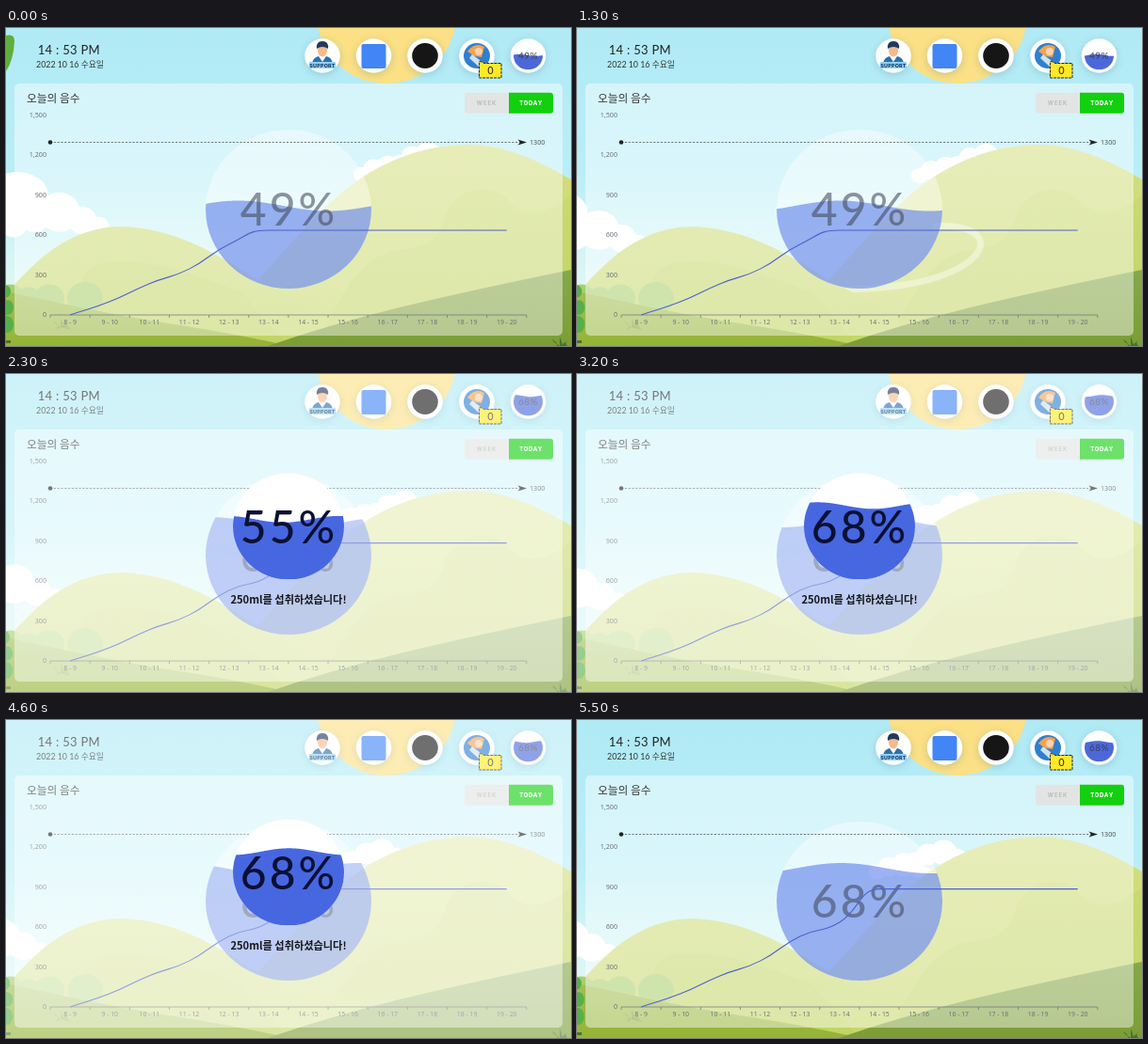
An HTML page with a canvas that plays this animation: 600 px wide and 338 px high, repeating every 5600 ms.

```html
<!DOCTYPE html>
<html lang="ko">
<head>
<meta charset="utf-8">
<title>오늘의 음수</title>
<style>
  html, body { margin: 0; height: 100%; overflow: hidden; }
  canvas { display: block; width: 100%; height: 100%; }
</style>
</head>
<body>
<canvas id="stage" width="600" height="338"></canvas>
<script>
const ctx = document.getElementById('stage').getContext('2d');
const LOOP = 5600, STEP = 100;
const DRINK_AT = 1900, MODAL_IN = 2000, MODAL_OUT = 5000;
const SANS = 'Inter, "Noto Sans CJK KR", sans-serif';
const KOREAN = '"Noto Sans CJK KR", "Noto Sans CJK", sans-serif';
const LABEL = '"Noto Sans", sans-serif';
const ROUND = 'Lato, sans-serif';

const clamp = v => Math.max(0, Math.min(1, v));
const mix = (a, b, k) => a + (b - a) * k;
const easeOut = k => 1 - (1 - k) ** 3;

function text(str, x, y, size, color, opts = {}) {
  const { align = 'center', weight = 400, font = SANS, spacing = 0 } = opts;
  ctx.font = `${weight} ${size}px ${font}`;
  ctx.letterSpacing = spacing + 'px';
  ctx.textAlign = align;
  ctx.fillStyle = color;
  ctx.fillText(str, x, y);
}

function oval(x, y, rx, ry, color) {
  ctx.beginPath();
  ctx.ellipse(x, y, rx, ry, 0, 0, Math.PI * 2);
  ctx.fillStyle = color;
  ctx.fill();
}

function box(x, y, w, h, radius, color) {
  ctx.beginPath();
  ctx.roundRect(x, y, w, h, radius);
  ctx.fillStyle = color;
  ctx.fill();
}

function shape(path, color) {
  ctx.fillStyle = color;
  ctx.fill(new Path2D(path));
}

function verticalGradient(y0, y1, ...colors) {
  const g = ctx.createLinearGradient(0, y0, 0, y1);
  colors.forEach((c, i) => g.addColorStop(i / (colors.length - 1), c));
  return g;
}

function cloud(x, y, size) {
  for (const [dx, dy, r] of [[-38, 9, 13], [-18, 0, 17], [6, -3, 20], [28, 5, 14], [44, 11, 10]])
    oval(x + dx * size, y + dy * size, r * size, r * size * 0.95, '#fff');
}

function grass(x, y, color) {
  for (const a of [-1, 0, 1])
    shape(`M${x} ${y} q${a * 7} -4 ${a * 8} ${Math.abs(a) * 3 - 10} q${2 - a * 6} 4 3 10Z`, color);
}

function liquid(cx, cy, rx, ry, level, amp, wavelength, crest, color) {
  ctx.save();
  ctx.beginPath();
  ctx.ellipse(cx, cy, rx, ry, 0, 0, Math.PI * 2);
  ctx.clip();
  ctx.beginPath();
  ctx.moveTo(cx - rx, cy + ry);
  for (let x = cx - rx; x <= cx + rx; x++)
    ctx.lineTo(x, level - amp * Math.cos((x - crest) / wavelength * Math.PI * 2));
  ctx.lineTo(cx + rx + 1, cy + ry);
  ctx.fillStyle = color;
  ctx.fill();
  ctx.restore();
}

function landscape(t) {
  ctx.fillStyle = verticalGradient(0, 300, '#b0eaf5', '#b9eef7', '#e6f8f4');
  ctx.fillRect(0, 0, 600, 338);
  oval(404, -14, 74, 73, '#fbe085');

  const k = t / LOOP, drift = 1 - Math.exp(-t / 2000);
  cloud(402 - 60 * k, 150 + 6 * k, 0.65);
  cloud(444 - 60 * k, 137 + 6 * k, 0.7);
  oval(12 - 70 * drift, 178 + 40 * drift, 33, 25, '#fff');
  cloud(50 - 70 * drift, 199 + 40 * drift, 1.1);

  // Right hill and its shaded side.
  shape('M240 338 L262 274 C300 232 325 202 354 177 C398 140 445 124 492 124 C530 124 568 142 600 161 V338Z',
    verticalGradient(125, 300, '#d3de80', '#c9d96e'));
  shape('M330 338 C350 295 370 248 410 237 C455 232 460 222 467 198 C480 168 512 166 530 180 C550 206 575 198 600 178 V338Z',
    'rgba(160,190,60,.14)');
  const trail = 0.4 * clamp(1 - Math.abs(t - 1300) / 550);
  if (trail > 0) {
    ctx.strokeStyle = `rgba(255,255,255,${trail})`;
    ctx.lineWidth = 7;
    ctx.stroke(new Path2D('M378 211 C440 206 448 242 385 264 Q345 278 270 278'));
  }

  // Left hill with its plateau, bushes and dark foreground.
  shape('M0 283 C25 255 62 211 124 211 C180 213 225 241 260 263 Q290 281 322 295 L340 338 H0Z',
    verticalGradient(211, 320, '#cddb78', '#c5d76a'));
  shape('M70 338 C98 280 62 262 102 250 C150 242 200 262 250 281 L300 338Z', 'rgba(160,190,60,.12)');
  for (const [x, r] of [[4, 16], [24, 13], [46, 16], [84, 19]])
    oval(x, 287, r, r * 0.9, '#a9cf6c');
  shape('M0 280 C60 293 110 304 160 312 Q240 324 301 338 H0Z', verticalGradient(280, 338, '#a2bf52', '#95b335'));
  shape('M278 338 Q344 315 418 297 T600 257 V338Z', verticalGradient(257, 338, '#85a84c', '#7c9d35'));

  const sway = Math.sin(k * Math.PI * 4);
  for (const [x, y, r] of [[0, 280, 5], [2, 297, 6], [1, 315, 7]])
    oval(x + sway, y, r, r * 1.3, '#55b04a');
  const leaf = -t * 0.02;
  shape(`M${leaf} 8 Q${leaf + 9} 6 ${leaf + 9} 14 Q${leaf + 8} 34 ${leaf} 46Z`, '#5fae3c');
  grass(588, 338, '#47752f');
  grass(58, 318, 'rgba(90,140,50,.5)');
  shape('M0 332 H5 V335 H0Z', '#47752f');
}

function header() {
  text('14 : 53 PM', 66.8, 28.3, 13, '#222', { font: ROUND, spacing: 0.3 });
  text('2022 10 16 수요일', 68, 41.5, 8.8, '#333', { font: `Lato, ${KOREAN}` });
}

function supportIcon(x) {
  shape(`M${x - 11} 38 Q${x - 10} 31 ${x - 4} 30 H${x + 4} Q${x + 10} 31 ${x + 11} 38Z`, '#2f6fae');
  shape(`M${x - 4} 30 L${x} 36 L${x + 4} 30Z`, '#fff');
  oval(x, 24, 5, 6.5, '#f5b98c');
  shape(`M${x - 6} 22 Q${x - 7} 14 ${x} 14 Q${x + 7} 14 ${x + 6} 22 Q${x} 18 ${x - 6} 22Z`, '#24385c');
  box(x - 14, 36, 28, 7, 1, '#8fd0f5');
  text('SUPPORT', x, 41.8, 5.4, '#17406f', { weight: 800, spacing: 0.2 });
}

function stretchIcon(x) {
  oval(x, 29.5, 14, 13.5, '#2f7fd0');
  shape(`M${x - 10} 25 Q${x - 2} 14 ${x + 8} 20 L${x + 5} 31 L${x - 2} 30Z`, '#f6a14b');
  oval(x + 2, 25, 4, 4, '#fbd3b0');
  shape(`M${x - 5} 28 L${x + 8} 38 L${x + 3} 42 L${x - 8} 32Z`, '#cfe0ee');
}

function badge() {
  const bubble = new Path2D('M503 35 L508 37.5 H526 V53 H502.5 V39Z');
  ctx.fillStyle = '#ffe926';
  ctx.fill(bubble);
  ctx.strokeStyle = '#222';
  ctx.lineWidth = 1;
  ctx.setLineDash([3, 1]);
  ctx.stroke(bubble);
  ctx.setLineDash([]);
  text('0', 514.5, 49, 11, '#222');
}

function icons(percent, level, crest) {
  const xs = [336, 390.5, 445, 500, 554.5];
  ctx.save();
  ctx.shadowColor = 'rgba(40,90,120,.22)';
  ctx.shadowBlur = 9;
  ctx.shadowOffsetY = 2;
  for (const x of xs) oval(x, 29.5, 18.8, 18.2, '#fff');
  ctx.restore();

  supportIcon(xs[0]);
  box(xs[1] - 13, 17, 26, 26, 2, '#4285f4');
  oval(xs[2], 29.5, 13.8, 13.4, '#161616');
  stretchIcon(xs[3]);
  badge();

  liquid(xs[4], 29.5, 15.5, 15, 29.5 + (level - 192.5) * 0.18, 1,
    34, xs[4] + (crest - 300) * 0.18, '#4c68d8');
  text(percent + '%', xs[4], 33, 10, '#3b4058', { font: ROUND, spacing: 0.4 });
}

function chart(rise) {
  text('오늘의 음수', 22, 78.8, 11.7, '#333', { align: 'left', font: KOREAN });
  box(487, 68.7, 94, 22, 3, '#e2e5e4');
  box(534, 68.7, 47, 22, [0, 3, 3, 0], '#12d00e');
  text('WEEK', 510.5, 82, 6, '#b9bcbb', { weight: 700, spacing: 0.9 });
  text('TODAY', 557.5, 82, 6, '#fff', { weight: 800, spacing: 0.7 });

  const slot = 42.15, left = 47, base = 305, scale = 212.5 / 1500;
  for (let v = 0; v <= 1500; v += 300)
    text(v.toLocaleString('en-US'), 43, base - v * scale + 2, 7.2, '#6e7079', { align: 'right', font: LABEL });

  ctx.strokeStyle = '#6e7079';
  ctx.lineWidth = 0.7;
  ctx.beginPath();
  ctx.moveTo(left, base);
  ctx.lineTo(left + slot * 12, base);
  for (let i = 0; i <= 12; i++) {
    ctx.moveTo(left + i * slot, base);
    ctx.lineTo(left + i * slot, base + 3);
    if (i < 12)
      text(`${i + 8} - ${i + 9}`, left + (i + 0.5) * slot, 315, 6.9, '#6e7079', { font: LABEL });
  }
  ctx.stroke();

  ctx.strokeStyle = '#444';
  ctx.lineWidth = 0.7;
  ctx.setLineDash([2.2, 1.6]);
  ctx.beginPath();
  ctx.moveTo(47, 121.5);
  ctx.lineTo(546, 121.5);
  ctx.stroke();
  ctx.setLineDash([]);
  oval(47, 121.5, 2.3, 2.3, '#222');
  shape('M553 121.5 L543.5 118.5 L546 121.5 L543.5 124.5Z', '#222');
  text('1300', 556, 123.5, 7.2, '#555', { align: 'left', font: LABEL });

  const final = 635 + 250 * rise;
  const values = [0, 100, 235, 345, 530, 635, ...Array(6).fill(final)];
  const pts = values.map((v, i) => [left + (i + 0.5) * slot, base - v * scale]);
  // Tangents follow the neighbours and turn horizontal beside level stretches.
  const tangent = i => {
    if (!pts[i - 1]) return (pts[1][1] - pts[0][1]) * 0.5;
    if (!pts[i + 1]) return 0;
    const before = pts[i][1] - pts[i - 1][1], after = pts[i + 1][1] - pts[i][1];
    return before * after === 0 ? 0 : (before + after) * 0.25;
  };
  ctx.beginPath();
  ctx.moveTo(...pts[0]);
  for (let i = 1; i < pts.length; i++) {
    const [x0, y0] = pts[i - 1], [x1, y1] = pts[i];
    ctx.bezierCurveTo(x0 + slot / 2, y0 + tangent(i - 1), x1 - slot / 2, y1 - tangent(i), x1, y1);
  }
  ctx.strokeStyle = '#4c63cc';
  ctx.lineWidth = 1.1;
  ctx.stroke();
}

function bigPercent(percent, baseline, color) {
  text(percent + '%', 300.5, baseline, 48, color, { font: ROUND, weight: 500, spacing: 3 });
}

function modal(t) {
  const alpha = Math.min(clamp((t - MODAL_IN + 100) / 200), clamp((MODAL_OUT + 200 - t) / 200));
  if (alpha <= 0) return;
  ctx.save();
  ctx.globalAlpha = alpha;
  ctx.fillStyle = 'rgba(255,255,255,.38)';
  ctx.fillRect(0, 0, 600, 338);
  const percent = Math.round(mix(49, 68, clamp((t - MODAL_IN) / 950)));
  oval(300, 162, 59, 56.5, '#fff');
  liquid(300, 162, 59, 56.5, 216 - percent * 1.12, 3.5, 118, 353 + (t - 2300) * 0.285, '#4667e0');
  bigPercent(percent, 179.8, '#0b1033');
  text('250ml를 섭취하셨습니다!', 300, 243.5, 11.2, '#15171c', { weight: 700, font: KOREAN });
  ctx.restore();
}

function draw(t) {
  const percent = t < DRINK_AT ? 49 : 68;
  const rise = easeOut(clamp((t - DRINK_AT) / 450));
  const level = mix(189, 157.5, rise);
  const crest = 247 + t * 0.317;

  landscape(t);
  header();
  icons(percent, level, crest);
  box(9, 59, 582, 268, 5, 'rgba(255,255,255,.44)');
  oval(300, 192.5, 88, 84.5, 'rgba(255,255,255,.4)');
  liquid(300, 192.5, 88, 84.5, level, 5.5, 190, crest, 'rgba(84,120,232,.57)');
  bigPercent(percent, 210, 'rgba(65,70,90,.58)');
  chart(rise);
  modal(t);
}

function frame(now) {
  draw(Math.floor(now % LOOP / STEP) * STEP);
  requestAnimationFrame(frame);
}
requestAnimationFrame(frame);
</script>
</body>
</html>
```
